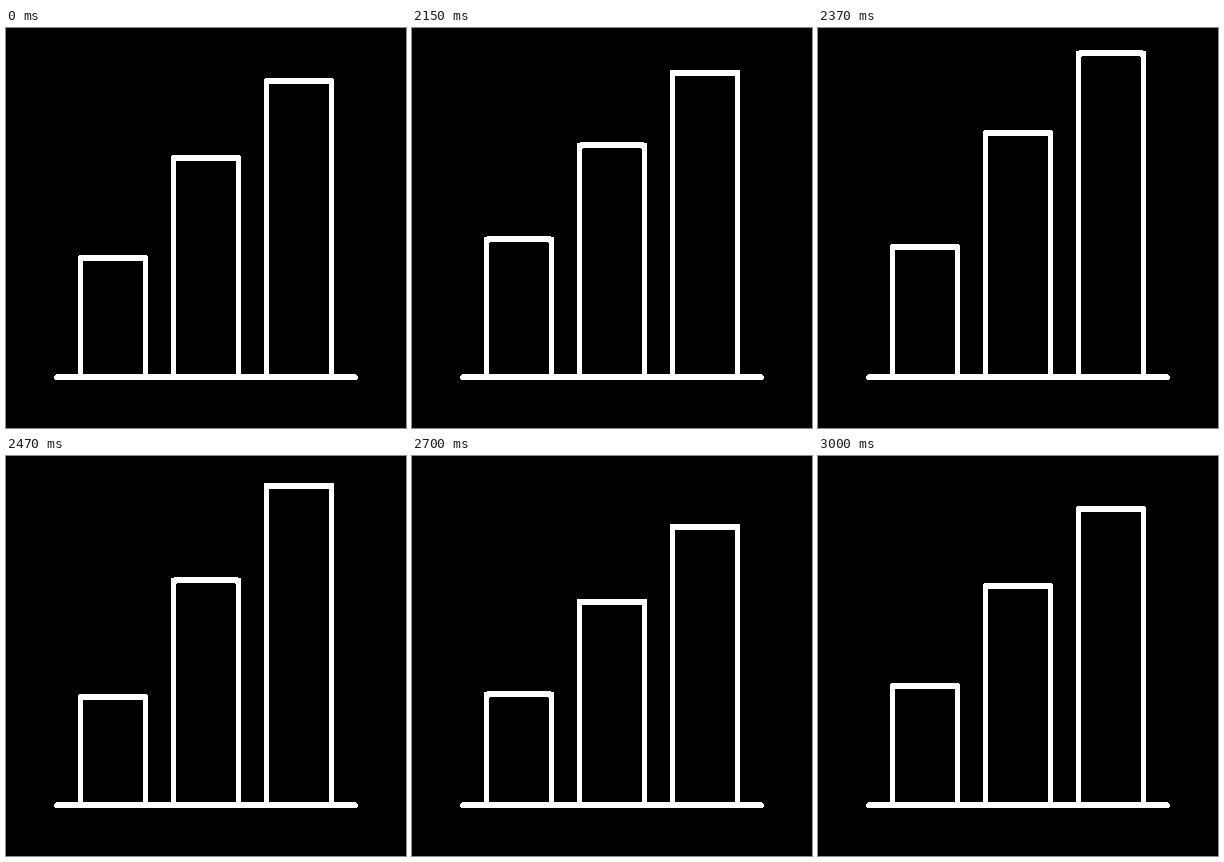
Animation, 400 px wide and 400 px high, one loop 3020 ms. Source, as an HTML page with a canvas:

```html
<!DOCTYPE html>
<html lang="en">
<head>
<meta charset="utf-8">
<title>Bar chart</title>
<style>
  html, body { margin: 0; width: 100%; height: 100%; overflow: hidden; background: #000; }
  canvas { display: block; width: 400px; height: 400px; }
</style>
</head>
<body>
<canvas id="stage" width="400" height="400"></canvas>
<script>
const SIZE = 400, LOOP = 3020, PAUSE = 2000;
const BASE = 349, BAR_WIDTH = 65;
const RISE = -28.2, DIP = 18;
const ctx = document.getElementById('stage').getContext('2d', { willReadFrequently: true });

// peak, low and end are times in ms after the pause
const bars = [
  { x: 74.5, top: 230, peak: 248, low: 553, end: 833 },
  { x: 167.5, top: 130, peak: 322, low: 633, end: 922 },
  { x: 260.5, top: 53, peak: 410, low: 719, end: 1006 }
];

function ease(t, t0, t1, from, to) {
  const p = Math.min(1, Math.max(0, (t - t0) / (t1 - t0)));
  return from + (to - from) * (1 - Math.cos(Math.PI * p)) / 2;
}

function offset(bar, t) {
  if (t < bar.peak) return ease(t, 0, bar.peak, 0, RISE);
  if (t < bar.low) return ease(t, bar.peak, bar.low, RISE, DIP);
  return ease(t, bar.low, bar.end, DIP, 0);
}

// 40 steps per second, shown for 30 and 20 ms in turn
function stepTime(ms) {
  const e = Math.max(0, ms - PAUSE);
  return 50 * Math.floor(e / 50) + (e % 50 >= 20 ? 25 : 0);
}

// Turn every pixel fully black or white
function hardenEdges() {
  const image = ctx.getImageData(0, 0, SIZE, SIZE);
  const px = image.data;
  for (let i = 0; i < px.length; i += 4) {
    px[i] = px[i + 1] = px[i + 2] = px[i] > 127 ? 255 : 0;
  }
  ctx.putImageData(image, 0, 0);
}

function draw(t) {
  ctx.fillStyle = '#000';
  ctx.fillRect(0, 0, SIZE, SIZE);
  ctx.strokeStyle = '#fff';
  ctx.lineWidth = 5.7;
  ctx.lineCap = ctx.lineJoin = 'round';
  ctx.beginPath();
  for (const bar of bars) {
    const y = bar.top + offset(bar, t);
    ctx.moveTo(bar.x, BASE);
    ctx.lineTo(bar.x, y);
    ctx.lineTo(bar.x + BAR_WIDTH, y);
    ctx.lineTo(bar.x + BAR_WIDTH, BASE);
  }
  ctx.moveTo(51, BASE);
  ctx.lineTo(349, BASE);
  ctx.stroke();
  hardenEdges();
}

let shown = -1;
function tick() {
  const t = stepTime(performance.now() % LOOP);
  if (t !== shown) draw(shown = t);
  requestAnimationFrame(tick);
}
tick();
</script>
</body>
</html>
```
